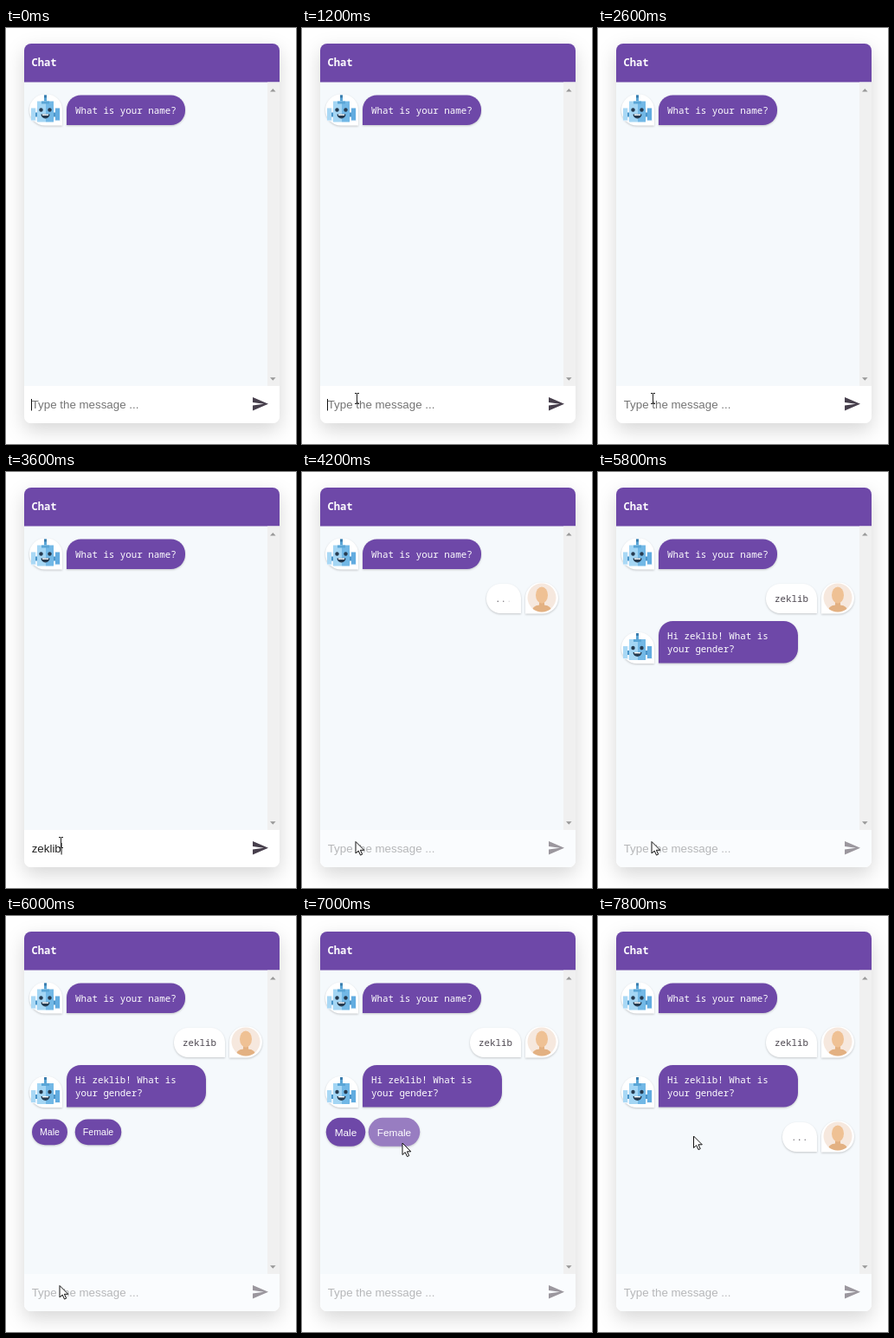
Recreate the animation shown at these times as an HTML page. Size 335 by 480 pixels, loop 8000 ms.

```html
<!DOCTYPE html>
<html lang="en">
<head>
<meta charset="utf-8">
<title>Chat</title>
<style>
html, body { margin: 0; width: 100%; height: 100%; overflow: hidden; background: #fff; }
svg { display: block; width: 335px; height: 480px; }
.card { filter: drop-shadow(0 8px 11px rgba(0, 0, 0, .16)); }
.bubble { filter: drop-shadow(0 1px 1px rgba(0, 0, 0, .2)); }
.mono { font: 500 10.8px "Noto Sans Mono", monospace; white-space: pre; }
.sans { font: 13.33px "Liberation Sans", Arial, sans-serif; }
.option { font: 11.8px "Liberation Sans", Arial, sans-serif; fill: #fff; text-anchor: middle; }
</style>
</head>
<body>
<svg viewBox="0 0 335 480">
  <defs>
    <clipPath id="cardClip"><rect x="21" y="18" width="295" height="438" rx="8"/></clipPath>
    <g id="robot">
      <path class="bubble" fill="#fff" d="M18 0H20A18 18 0 0 1 38 18V36H18A18 18 0 0 1 18 0Z"/>
      <path fill="#eaf4fc" d="M2 16H36V31H2Z"/>
      <path fill="#5ba6d6" d="M17 1h3v7h-3z"/>
      <path fill="#3b7eae" d="M17 1h3v3h-3z"/>
      <path fill="#a9d8f5" d="M2 16h5v14H2z"/>
      <path fill="#62ace0" d="M30 16h5v14h-5z"/>
      <path fill="#4b95c9" d="M7 21h3v5H7zM27 21h3v5h-3z"/>
      <path fill="#a4d6f4" d="M9 8h10v24H9z"/>
      <path fill="#72b8e6" d="M19 8h9v24h-9z"/>
      <path fill="#5ba6d6" d="M14 8h9v3h-9z"/>
      <circle cx="13.5" cy="18" r="2.2" fill="#263b50"/>
      <circle cx="23.5" cy="18" r="2.2" fill="#263b50"/>
      <path fill="#263b50" d="M13.5 23h10a5 5 0 0 1-10 0z"/>
      <path fill="#fff" d="M15 23h7v1.4h-7z"/>
    </g>
    <g id="person">
      <path class="bubble" fill="#fff" d="M18 0H20A18 18 0 0 1 20 36H0V18A18 18 0 0 1 18 0Z"/>
      <clipPath id="face"><circle cx="19" cy="17.5" r="16.5"/></clipPath>
      <g clip-path="url(#face)">
        <path fill="#f6e8de" d="M0 0h38v36H0z"/>
        <path fill="#e3b182" d="M7 36q0-9 9-10v-5h6v5q9 1 9 10z"/>
        <ellipse cx="19" cy="14.5" rx="7" ry="9.5" fill="#efc194"/>
      </g>
    </g>
  </defs>

  <rect class="card" x="21" y="18" width="295" height="438" rx="8" fill="#fff"/>
  <g clip-path="url(#cardClip)">
    <path fill="#f5f9fc" d="M21 62h295v351H21z"/>
    <path fill="#6e48a8" d="M21 18h295v44.500H21z"/>
    <path fill="#f0f0f0" d="M302 62.500h14v350.500h-14z"/>
    <path fill="#fff" d="M21 413h295v43H21z"/>
    <path id="shade" fill="#fafcfe" d="M21 413h295v43H21z"/>
  </g>
  <path fill="#999" d="M305 73.500l3.300-3.500 3.300 3.500zM305 403.300l3.300 3.500 3.300-3.500z"/>
  <text class="mono" x="29.500" y="44" fill="#fff" style="font-size:12.100px;font-weight:800">Chat</text>

  <g id="messages"></g>

  <text class="sans" id="field" x="29.700" y="438.500"></text>
  <path id="caret" stroke="#111" d="M0 428v13.500"/>
  <path id="send" fill="#473f4c" transform="translate(283.300 423.400) scale(.857)"
        d="M2 21 23 12 2 3v7l15 2-15 2z"/>
  <path id="beam" fill="none" stroke="#222" d="M61 421.500h2l.5.500.500-.500h2M63.500 422v11M61 433.500h2l.5-.500.500.500h2"/>
  <path id="arrow" fill="#fff" stroke="#111" stroke-linejoin="round"
        d="M0 0v13.500l3.200-2.900 2.300 5 2.200-1-2.300-4.800h4.400z"/>
</svg>

<script>
const LOOP = 8000, PURPLE = "#6e48a8", NAME = "zeklib";
const SENT = 3800, NAMED = 4800, REPLIED = 5600, OPTIONS = 5800, CHOSEN = 7200;
const $ = id => document.getElementById(id);
const clamp = v => Math.max(0, Math.min(1, v));
const ease = v => v * v * (3 - 2 * v);
const show = (el, on) => el.setAttribute("visibility", on ? "visible" : "hidden");

function add(markup) {
  const g = document.createElementNS("http://www.w3.org/2000/svg", "g");
  g.innerHTML = markup;
  $("messages").append(g);
  return g;
}

// Rounded bubble with one square bottom corner on the avatar side.
function bubblePath(x, y, w, h, bot) {
  const r = 16.5, arc = (dx, dy) => `a${r} ${r} 0 0 1 ${dx} ${dy}`;
  const right = bot ? `v${h - 2 * r}${arc(-r, r)}` : `v${h - r}h${-r}`;
  const left = bot ? `h${r - w}v${r - h}` : `h${2 * r - w}${arc(-r, -r)}v${2 * r - h}`;
  return `M${x + r} ${y}h${w - 2 * r}${arc(r, r)}${right}${left}${arc(r, -r)}z`;
}

const messages = [];
function message(from, to, bot, x, y, w, h, lines) {
  const typing = !lines;
  const ink = bot ? "#fff" : "#4c464f";
  const rows = (lines || [[0, 1, 2].map(() => "<tspan>.</tspan>").join("")])
    .map((s, i) => `<text class="mono" x="${x + 10}" y="${y + 21.2 + i * 14.5}" fill="${ink}"
      ${bot ? "" : 'style="font-weight:400"'}>${s}</text>`).join("");
  const g = add(`<path class="bubble" fill="${bot ? PURPLE : "#fff"}" d="${bubblePath(x, y, w, h, bot)}"/>
    <use href="#${bot ? "robot" : "person"}" x="${bot ? 27 : 258}" y="${y + h - 35.500}"/>${rows}`);
  messages.push({ g, from, to, dots: typing ? [...g.querySelectorAll("tspan")] : [] });
}

message(0, LOOP, true, 70, 77.500, 137, 34.500, ["What is your name?"]);
message(SENT, 4600, false, 213, 129, 40, 34);
message(4600, LOOP, false, 194, 129, 59, 34, [NAME]);
message(NAMED, REPLIED, true, 70, 182, 37, 33);
message(REPLIED, LOOP, true, 70, 172, 161, 48.500, [`Hi ${NAME}! What is`, "your gender?"]);
message(CHOSEN, LOOP, false, 213, 238, 40, 34);

function option(label, cx, w) {
  return add(`<rect class="bubble" x="${-w / 2}" y="-16.500" width="${w}" height="33" rx="16.500" fill="${PURPLE}"/>
    <text class="option" y="4.200">${label}</text><desc>${cx}</desc>`);
}
const options = [["Male", 50.5, 45.5], ["Female", 106.5, 59.5]]
  .map(([label, cx, w]) => ({ g: option(label, cx, w), cx }));

// A dot brightens over the first fifth of its cycle, then fades.
function dotOpacity(ms) {
  if (ms < 0) return .2;
  const p = ms % 1400 / 1400;
  return p < .2 ? .2 + 4 * p : 1 - (p - .2);
}

function mouseAt(t) {
  const a = ease(clamp((t - 6150) / 700)), b = ease(clamp((t - 7200) / 500));
  return [62 + 54 * a - 5.5 * b, 426.5 - 164.5 * a - 8 * b];
}

function draw(t) {
  for (const { g, from, to, dots } of messages) {
    show(g, t >= from && t < to);
    dots.forEach((d, i) => d.setAttribute("fill-opacity", dotOpacity(t - from - i * 200)));
  }

  const [mx, my] = mouseAt(t), scale = ease(clamp((t - OPTIONS) / 250));
  options.forEach(({ g, cx }, i) => {
    show(g, t >= OPTIONS && t < CHOSEN);
    g.setAttribute("transform", `translate(${cx} 249.3) scale(${scale})`);
    const hover = i === 1 && mx > 77 && my < 266;
    g.firstChild.setAttribute("fill", hover ? "#987dc1" : PURPLE);
  });

  const disabled = t >= SENT;
  const count = disabled ? 0 : Math.max(0, Math.min(NAME.length, Math.floor((t - 2700) / 130)));
  const field = $("field");
  field.textContent = count ? NAME.slice(0, count) : "Type the message ...";
  field.setAttribute("fill", count ? "#222" : disabled ? "#b6b7b9" : "#747474");
  $("send").setAttribute("fill", disabled ? "#9b979e" : "#473f4c");
  show($("shade"), disabled);

  const blink = count > 0 || Math.floor((t + 100) / 530) % 2 === 0;
  show($("caret"), !disabled && blink);
  const caretX = count ? 30 + field.getComputedTextLength() : 29.5;
  $("caret").setAttribute("transform", `translate(${caretX} 0)`);

  show($("beam"), t >= 1200 && !disabled);
  show($("arrow"), disabled);
  $("arrow").setAttribute("transform", `translate(${mx} ${my})`);
}

const start = performance.now();
function tick() {
  draw((performance.now() - start) % LOOP);
  requestAnimationFrame(tick);
}
tick();
</script>
</body>
</html>
```
